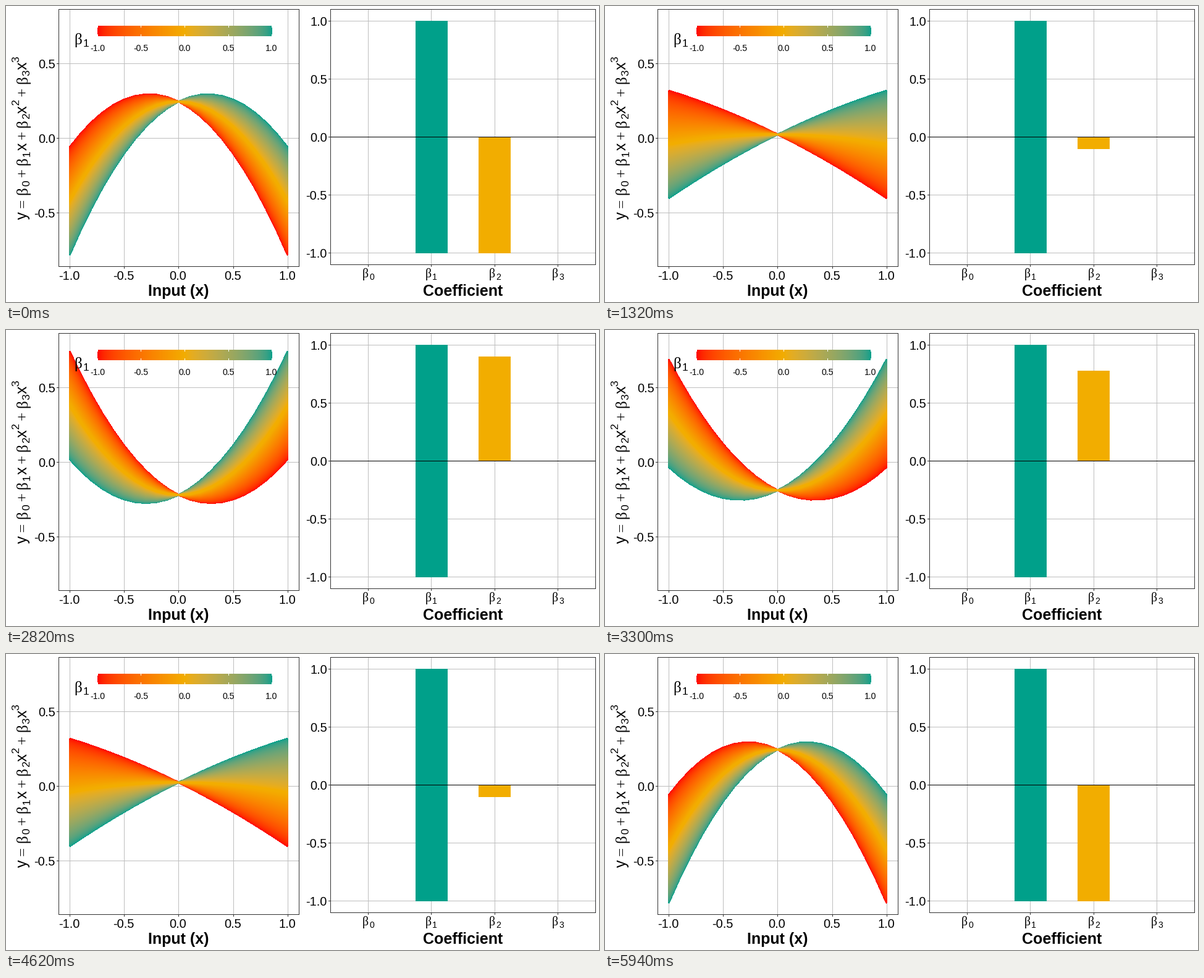
Animation, 960 px wide and 480 px high, one loop 6 s. Source, as a matplotlib script:

```python
import numpy as np
import matplotlib.pyplot as plt
from matplotlib.animation import FuncAnimation
from matplotlib.collections import LineCollection
from matplotlib.colors import to_rgb
from matplotlib.patches import Rectangle

W, H, DPI = 960, 480, 100
PT = 72 / DPI  # points per pixel
FRAMES, INTERVAL = 100, 60
RED, GOLD, TEAL = "#FF0000", "#F2AD00", "#00A08A"
GRID, BORDER = "#BEBEBE", "#333333"

plt.rcParams["font.family"] = "Liberation Sans"

# ---------- colour ramp, interpolated in CIE Lab ----------
RGB_XYZ = np.array([[0.4124, 0.3576, 0.1805],
                    [0.2126, 0.7152, 0.0722],
                    [0.0193, 0.1192, 0.9505]])
WHITE = RGB_XYZ.sum(axis=1)
XYZ_LAB = np.array([[0, 116, 0], [500, -500, 0], [0, 200, -200]])


def rgb_to_lab(rgb):
    lin = np.where(rgb > 0.04045, ((rgb + 0.055) / 1.055) ** 2.4, rgb / 12.92)
    t = lin @ RGB_XYZ.T / WHITE
    f = np.where(t > 0.008856, np.cbrt(t), 7.787 * t + 16 / 116)
    return f @ XYZ_LAB.T - [16, 0, 0]


def lab_to_rgb(lab):
    f = (lab + [16, 0, 0]) @ np.linalg.inv(XYZ_LAB).T
    t = np.where(f > 0.2069, f ** 3, (f - 16 / 116) / 7.787)
    lin = np.clip(t * WHITE @ np.linalg.inv(RGB_XYZ).T, 0, 1)
    return np.where(lin > 0.0031308, 1.055 * lin ** (1 / 2.4) - 0.055, 12.92 * lin)


def ramp(values):
    stops = rgb_to_lab(np.array([to_rgb(c) for c in (RED, GOLD, TEAL)]))
    lab = np.column_stack([np.interp(values, [-1, 0, 1], s) for s in stops.T])
    return np.clip(lab_to_rgb(lab), 0, 1)


# ---------- drawing helpers, all in pixels ----------
fig = plt.figure(figsize=(W / DPI, H / DPI), dpi=DPI, facecolor="white")
ax = fig.add_axes([0, 0, 1, 1])
ax.axis("off")


def line(x0, y0, x1, y1, color, z):
    ax.plot([x0, x1], [y0, y1], color=color, lw=PT, aa=False, snap=False,
            solid_capstyle="butt", zorder=z)


def text(x, y, s, size, ha="center", **kw):
    ax.text(x, y, s, fontsize=size * PT, ha=ha, va="baseline", zorder=9, **kw)


def box(x, y, w, h, color, z):
    return ax.add_patch(Rectangle((x, y), w, h, fc=color, ec="none", lw=0,
                                  aa=False, snap=False, zorder=z))


def panel(left, top, right, bottom, xs, ys):
    for x in xs:
        line(x, top, x, bottom, GRID, 1)
        line(x, bottom, x, bottom + 3, BORDER, 6)
    for y in ys:
        line(left, y, right, y, GRID, 1)
        line(left - 3, y, left, y, BORDER, 6)
    ax.add_patch(Rectangle((left, top), right - left, bottom - top, fill=False,
                           ec=BORDER, lw=PT, aa=False, snap=False, zorder=6))


# formula metrics in em: advance widths, space around operators, script shifts
ADVANCE = {"x": 0.5, "y": 0.5, "β": 0.549, "+": 0.549, "=": 0.549}
PAD = {"=": 5 / 18, "+": 4 / 18}
SHIFT = {"_": -0.18, "^": 0.5}


def formula(x, y, source, size, centre=True, vertical=False):
    glyphs, pos, shift = [], 0, 0
    for c in source:
        if c in SHIFT:
            shift = SHIFT[c]
            continue
        scale = 0.7 if shift else 1
        pad = PAD.get(c, 0)
        glyphs.append((c, pos + pad, shift, scale))
        pos += ADVANCE.get(c, 0.556) * scale + 2 * pad
        shift = 0
    start = -pos / 2 if centre else 0
    for c, at, shift, scale in glyphs:
        along, up = (start + at) * size, shift * size
        gx, gy = (x - up, y - along) if vertical else (x + along, y - up)
        family = "Liberation Serif" if c in "β+=" else "Liberation Sans"
        text(gx, gy, c, size * scale, ha="left", family=family,
             rotation=90 if vertical else 0, rotation_mode="anchor")


# ---------- left panel ----------
X0, XS = 279.5, 176.5
Y0, YS = 214.2, 242
left_x = [103.5, 191.5, 279.5, 368.5, 456.5]
left_y = [93.5, 214.5, 335.5]
panel(85.5, 5.5, 474.5, 422.5, left_x, left_y)
for x, v in zip(left_x, np.linspace(-1, 1, 5)):
    text(x - 1, 444, f"{v:.1f}", 20)
for y, v in zip(left_y, (0.5, 0, -0.5)):
    text(80, y + 7.5, f"{v:.1f}", 20, ha="right")
text(279, 470, "Input (x)", 25, weight="bold")
formula(34, 213.5, "y=β_0+β_1x+β_2x^2+β_3x^3", 25, vertical=True)

# ---------- colour legend ----------
ax.imshow(ramp(np.linspace(-1, 1, 283))[None], extent=(148, 431, 49, 32),
          aspect="auto", interpolation="nearest", zorder=7)
for x, v in zip((148.5, 218.5, 289.5, 360.5, 430.5), np.linspace(-1, 1, 5)):
    line(x, 32, x, 35, "white", 8)
    line(x, 46, x, 49, "white", 8)
    text(x - 0.5, 73, f"{v:.1f}", 14)
formula(110.5, 62, "β_1", 25, centre=False)

# ---------- right panel ----------
ZERO, UNIT = 212.5, 188.3
right_x = [586.5, 688.5, 791.5, 893.5]
right_y = [24.5, 118.5, 212.5, 306.5, 400.5]
panel(525.5, 5.5, 954.5, 419.5, right_x, right_y)
for k, x in enumerate(right_x):
    formula(x, 440, f"β_{k}", 20)
for y, v in zip(right_y, np.linspace(1, -1, 5)):
    text(520, y + 7.5, f"{v:.1f}", 20, ha="right")
text(739.5, 470, "Coefficient", 25, weight="bold")
box(663, 24, 52, 377, TEAL, 3)
bar = box(765, ZERO, 52, 0, GOLD, 3)
line(525.5, ZERO, 954.5, ZERO, "black", 5)

# ---------- curves on an orthonormal polynomial basis ----------
x = np.linspace(-1, 1, 21)
linear = x / np.sqrt((x ** 2).sum())
quad = x ** 2 - (x ** 2).mean()
quad /= np.sqrt((quad ** 2).sum())

# steepest curves first, so the flat one lies on top
beta1 = np.array(sorted(np.linspace(-1, 1, 201), key=lambda b: -abs(b)))
curves = LineCollection([], colors=ramp(beta1), linewidths=2 * PT,
                        antialiaseds=False, zorder=3)
ax.add_collection(curves)
ax.set_xlim(0, W)
ax.set_ylim(H, 0)

# beta2 steps by 0.05 up and back; each step lands on a whole frame
steps = np.arange(81)
keys = np.round(1 + (FRAMES - 1) * steps / 80) - 1
beta2 = np.interp(np.arange(FRAMES), keys, 1 - np.abs(steps - 40) / 20)


def update(i):
    b2 = beta2[i]
    y = beta1[:, None] * linear + b2 * quad
    px = np.broadcast_to(X0 + XS * x, y.shape)
    curves.set_segments(np.stack([px, Y0 - YS * y], axis=-1))
    # the bar fills every pixel row it touches
    tip = ZERO - UNIT * b2
    top, bottom = np.floor(min(tip, ZERO)), np.ceil(max(tip, ZERO))
    bar.set_y(top)
    bar.set_height(bottom - top)
    return curves, bar


anim = FuncAnimation(fig, update, frames=FRAMES, interval=INTERVAL, repeat=True)
plt.show()
```
